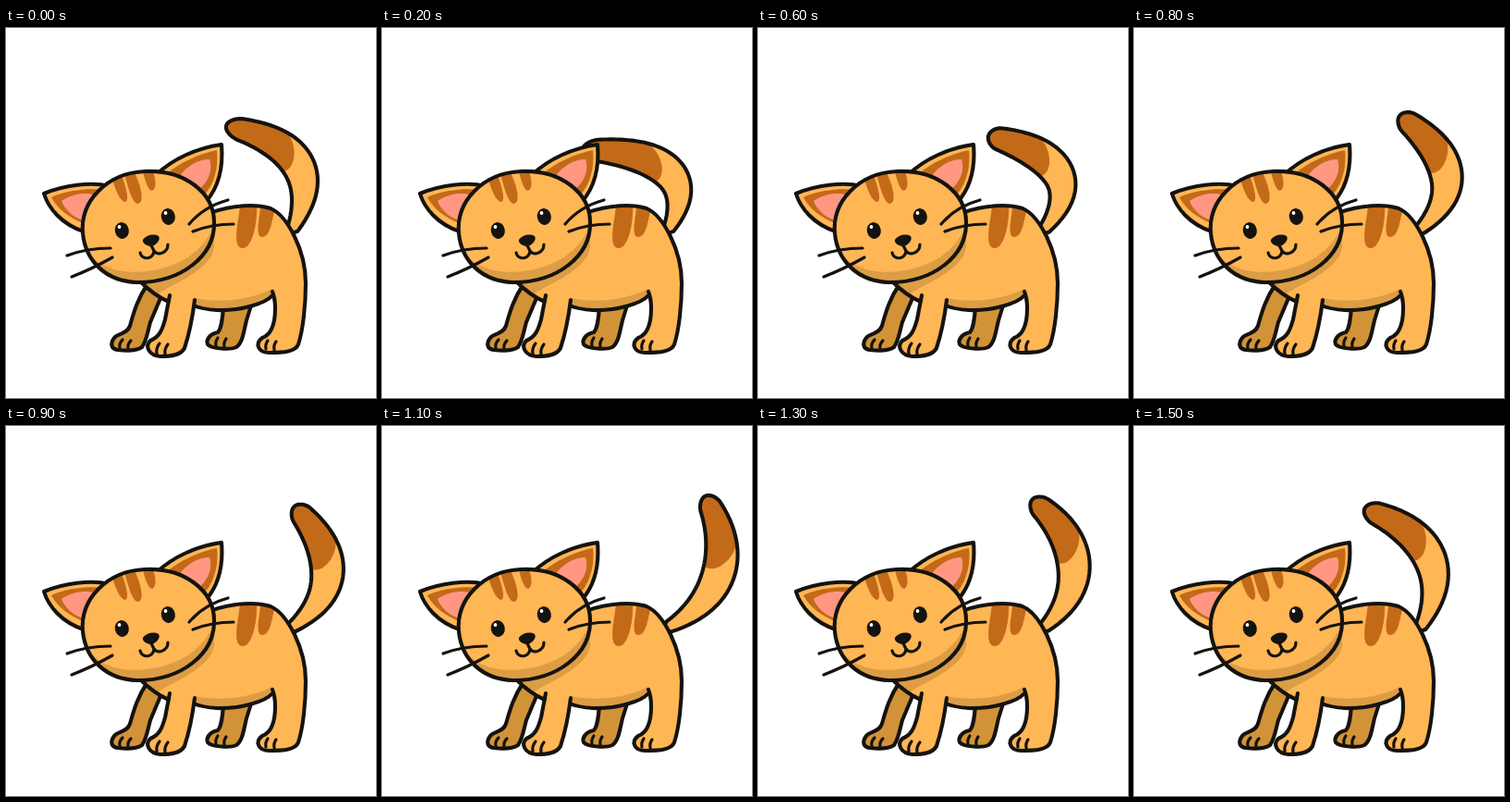
Recreate the animation shown at these times as an HTML page. Size 400 by 400 pixels, loop 1.6 s.

```html
<!DOCTYPE html>
<html lang="en">
<head>
<meta charset="utf-8">
<title>Cat wagging its tail</title>
<style>
html, body { margin: 0; width: 100%; height: 100%; overflow: hidden; background: #fff; }
svg { display: block; width: 100%; height: 100%; }
.line, .thin { stroke: #151310; stroke-linejoin: round; stroke-linecap: round; }
.line { stroke-width: 4.1; }
.thin { stroke-width: 3.2; fill: none; }
.coat { fill: #ffb654; }
.far { fill: #d29338; }
.shade { fill: #dc9d45; }
.brown { fill: #c36a19; }
.pink { fill: #ff9783; }
.ink { fill: #151310; }
.none { fill: none; }
</style>
</head>
<body>
<svg viewBox="0 0 400 400">
  <g id="tail">
    <path id="fur" class="coat"/>
    <path id="tip" class="brown"/>
    <path id="edge" class="line none"/>
  </g>

  <g id="far-legs">
    <path class="line far" d="M153 277C142 293 138 308 134 322C131 331 121 330 117 335C112 342 114 347 121 348C130 349 141 349 147 345C152 338 153 329 156 318L167 292Z"/>
    <path class="line far" d="M235 302C234 314 233 325 229 329C220 331 216 337 218 342C222 347 243 348 249 345C256 340 257 328 260 316L265 300Z"/>
    <path class="thin" d="M126 337Q122 341 123 346M135 338Q131 342 132 347M229 335Q226 339 227 344M238 336Q235 340 236 345"/>
  </g>

  <g id="body">
    <path class="coat" d="M220 200C246 191 270 190 286 195C304 203 324 240 324 276C324 300 321 327 316 342C313 350 300 351 285 351C272 351 269 341 277 335C288 331 291 318 291 303L287 290C281 297 255 306 228 305Q212 304 203 300C201 318 197 334 193 346C189 354 178 355 167 355C154 354 150 344 156 338C166 334 169 326 172 315L176 296Q160 289 145 274Z"/>
    <path class="shade" d="M147 275C180 278 212 258 224 226Q229 243 213 257C196 273 175 279 164 288Z"/>
    <path class="shade" d="M204 292C232 298 263 294 288 282L287 290C277 299 254 306 228 305Q212 304 203 300Z"/>
    <path class="brown" d="M253 193C251 210 244 238 256 238C267 238 272 208 271 193Z"/>
    <path class="brown" d="M275 193C274 207 269 226 277 226C285 226 287 212 290 198Z"/>
    <path class="line none" d="M220 200C246 191 270 190 286 195C304 203 324 240 324 276C324 300 321 327 316 342C313 350 300 351 285 351C272 351 269 341 277 335C288 331 291 318 291 303Q291 292 288 285M287 290C281 297 255 306 228 305Q212 304 203 300M204 294C201 318 197 334 193 346C189 354 178 355 167 355C154 354 150 344 156 338C166 334 169 326 172 315L177 289M176 296Q160 289 145 274"/>
    <path class="thin" d="M166 341Q162 346 163 352M175 342Q171 347 172 353M283 338Q280 342 281 347M292 339Q289 343 290 348"/>
  </g>

  <g id="ears">
    <path class="line coat" d="M112 171C92 166 62 170 41 179C46 195 60 212 84 220Z"/>
    <path class="brown" d="M49 183C66 175 90 173 107 175L84 211C69 206 56 196 49 183Z"/>
    <path class="pink" d="M60 187C72 179 87 177 98 181L84 208C73 205 64 197 60 187Z"/>
    <path class="line coat" d="M163 158C180 142 205 130 233 126C235 150 230 172 216 188Z"/>
    <path class="brown" d="M173 158C189 145 208 136 228 132C230 151 225 169 214 181Z"/>
    <path class="pink" d="M187 161C195 149 208 142 220 142C224 154 218 167 209 174Z"/>
  </g>

  <g id="head">
    <path class="coat" d="M83 222C80 188 108 157 150 155C193 153 225 178 225 210C226 246 190 275 142 275C108 274 86 252 83 222Z"/>
    <path class="shade" d="M86 240C103 262 130 267 158 262C188 257 212 243 225 214C226 246 190 275 142 275C112 274 92 260 86 240Z"/>
    <path class="brown" d="M115 163C118 175 123 186 128 188C133 188 132 179 125 159Z"/>
    <path class="brown" d="M128 158C132 172 136 188 142 190C149 190 148 176 139 156Z"/>
    <path class="brown" d="M148 155C150 165 154 176 158 176C163 174 162 163 159 156Z"/>
    <path class="line none" d="M83 222C80 188 108 157 150 155C193 153 225 178 225 210C226 246 190 275 142 275C108 274 86 252 83 222Z"/>
    <g id="eye">
      <ellipse class="ink" cx="125.300" cy="219" rx="7.500" ry="9" transform="rotate(-12 125 219)"/>
      <circle cx="122.500" cy="215" r="1.900" fill="#fff"/>
    </g>
    <use href="#eye" x="50" y="-15"/>
    <path class="ink" d="M148 229C151 224 160 222 165 225C168 229 161 236 157 236C153 236 147 233 148 229Z"/>
    <path class="thin" d="M157 235L160 241M145 243C147 251 159 251 160 241C164 247 175 243 175 234"/>
    <path class="thin" d="M66 246Q87 238 113 238M71 269Q94 260 115 248M240 186Q214 193 198 212M246 212Q222 212 202 220"/>
  </g>
</svg>
<script>
const LOOP = 1600, STEP = 100;
const BASE = [310, 217], ROOT = [302, 224];
const DARK_IN = 0.5, DARK_OUT = 0.7;

// The tail's midline is a Bezier curve from BASE: two bends and the end, per key pose
const poses = [
  { t: 0,    bend: [339, 159], curl: [316, 122], end: [238, 106] },
  { t: 400,  bend: [346, 160], curl: [290, 139], end: [206, 148] },
  { t: 600,  bend: [359, 157], curl: [303, 129], end: [249, 117] },
  { t: 800,  bend: [361, 171], curl: [336, 130], end: [287, 95] },
  { t: 1100, bend: [371, 186], curl: [382, 132], end: [349, 76] },
  { t: 1300, bend: [360, 172], curl: [347, 118], end: [296, 80] },
  { t: 1500, bend: [346, 154], curl: [313, 111], end: [249, 90] }
];

const byId = id => document.getElementById(id);
const fur = byId("fur"), tip = byId("tip"), edge = byId("edge");

// Pose by index, wrapped round the loop
function pose(i) {
  const turn = Math.floor(i / poses.length);
  const q = poses[i - turn * poses.length];
  return { ...q, t: q.t + turn * LOOP };
}

// Smooth motion through the key poses
function midlineAt(time) {
  const i = poses.findLastIndex(q => q.t <= time);
  const [a, b, c, d] = [-1, 0, 1, 2].map(k => pose(i + k));
  const span = c.t - b.t, u = (time - b.t) / span, v = 1 - u;
  const mix = key => [0, 1].map(k => {
    const m0 = (c[key][k] - a[key][k]) / (c.t - a.t) * span;
    const m1 = (d[key][k] - b[key][k]) / (d.t - b.t) * span;
    return v * v * ((1 + 2 * u) * b[key][k] + u * m0)
         + u * u * ((1 + 2 * v) * c[key][k] - v * m1);
  });
  return [BASE, mix("bend"), mix("curl"), mix("end")];
}

// Half width: narrow root, full middle, round end
function halfWidth(s) {
  const cap = Math.max(0, (s - 0.93) / 0.07);
  return (6 + 4 * s + 9.5 * Math.sin(Math.PI * s)) * Math.sqrt(Math.max(0, 1 - cap * cap));
}

// Point on the tail's outer (side 1) or inner (side -1) edge
function edgePoint(mid, s, side) {
  const [p, q, r, e] = mid, n = 1 - s;
  const at = k => n ** 3 * p[k] + 3 * n * n * s * q[k] + 3 * n * s * s * r[k] + s ** 3 * e[k];
  const slope = k => n * n * (q[k] - p[k]) + 2 * n * s * (r[k] - q[k]) + s * s * (e[k] - r[k]);
  const dx = slope(0), dy = slope(1), w = side * halfWidth(s) / Math.hypot(dx, dy);
  return [at(0) - dy * w, at(1) + dx * w];
}

// Edge points from s to the end, closer together near the end
function edgeFrom(mid, s, side, count = 48) {
  return Array.from({ length: count + 1 }, (_, i) =>
    edgePoint(mid, s + (1 - s) * Math.sin(i / count * Math.PI / 2), side));
}

const fmt = p => p.map(v => v.toFixed(2)).join(" ");
const path = pts => "M" + pts.map(fmt).join("L");

function draw(time) {
  const mid = midlineAt(time);
  const around = (inner, outer) => [...edgeFrom(mid, outer, 1), ...edgeFrom(mid, inner, -1).reverse()];
  const outline = path([ROOT, ...around(0, 0), ROOT]);
  fur.setAttribute("d", outline);
  edge.setAttribute("d", outline);

  // The dark end bulges towards the root
  const patch = around(DARK_IN, DARK_OUT), a = patch.at(-1), b = patch[0];
  const dx = b[0] - a[0], dy = b[1] - a[1];
  const c1 = [a[0] - dy * 0.38 + dx * 0.1, a[1] + dx * 0.38 + dy * 0.1];
  const c2 = [b[0] - dy * 0.3 - dx * 0.2, b[1] + dx * 0.3 - dy * 0.2];
  tip.setAttribute("d", path(patch) + "C" + [c1, c2, b].map(fmt).join(" ") + "Z");
}

const begin = performance.now();
function tick() {
  const t = (performance.now() - begin) % LOOP;
  draw(Math.floor(t / STEP) * STEP);
  requestAnimationFrame(tick);
}
tick();
</script>
</body>
</html>
```
